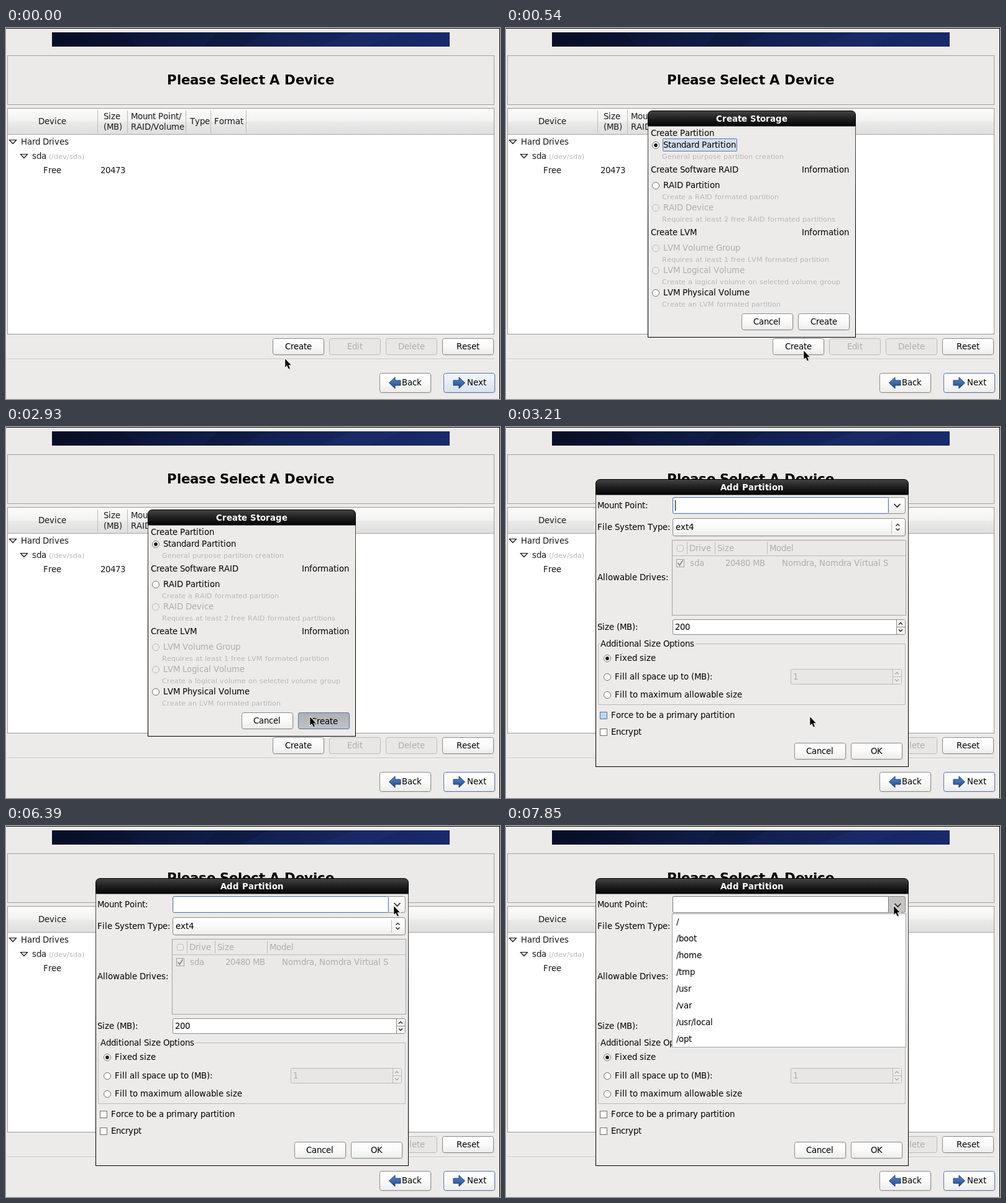
Write an HTML page that moves like this. It is 795 px wide and 598 px high and loops after 8000 ms.

```html
<!DOCTYPE html>
<html lang="en">
<head>
<meta charset="utf-8">
<title>Partition setup</title>
<style>
  html, body { margin: 0; width: 100%; height: 100%; overflow: hidden; background: #edebe9; }
  svg { display: block; }
  text { fill: #1a1a1a; white-space: pre; font-variant-ligatures: none; font-kerning: none; }
  .k { fill: #000; }
  .off { fill: #b0aeac; }
  .small { fill: #bab8b6; }
  .bar { fill: #fff; }
  .head { fill: #000; }
</style>
</head>
<body>
<svg id="stage" width="795" height="598" viewBox="0 0 795 598">
  <defs>
    <linearGradient id="banner"><stop stop-color="#080f28"/><stop offset=".5" stop-color="#11204f"/><stop offset="1" stop-color="#182a6c"/></linearGradient>
    <linearGradient id="face" x2="0" y2="1"><stop stop-color="#fff"/><stop offset=".5" stop-color="#fafafa"/><stop offset="1" stop-color="#ececeb"/></linearGradient>
    <linearGradient id="blueFace" x2="0" y2="1"><stop stop-color="#f4f7fb"/><stop offset="1" stop-color="#d9e1ed"/></linearGradient>
    <linearGradient id="down" x2="0" y2="1"><stop stop-color="#aeb0b4"/><stop offset="1" stop-color="#c0c2c5"/></linearGradient>
    <linearGradient id="header" x2="0" y2="1"><stop stop-color="#fcfcfc"/><stop offset=".5" stop-color="#f2f2f1"/><stop offset=".52" stop-color="#eaeae9"/><stop offset="1" stop-color="#e0dfde"/></linearGradient>
    <linearGradient id="dark" x2="0" y2="1"><stop stop-color="#444"/><stop offset=".5" stop-color="#202020"/><stop offset="1" stop-color="#040404"/></linearGradient>
    <linearGradient id="frame" x2="0" y2="1"><stop stop-color="#555"/><stop offset=".5" stop-color="#000"/></linearGradient>
    <linearGradient id="arrow" x2="0" y2="1"><stop stop-color="#5b8ac6"/><stop offset="1" stop-color="#1f4a8c"/></linearGradient>
  </defs>
</svg>
<script>
const LOOP = 8000;
const BG = '#edebe9', EDGE = '#8d8b89', PALE = '#bdbbb9', BLUE = '#5677ab';
const FAMILY = '"DejaVu Sans", sans-serif';
const FONTS = { small: '11.11px', bar: 'bold 13.33px', head: 'bold 21.33px' };
const stage = document.getElementById('stage');
const pen = document.createElement('canvas').getContext('2d');

// Text sits on the pixel grid: every glyph advances by a whole number of pixels
const fontOf = cls => `${FONTS[cls] || '13.33px'} ${FAMILY}`;
function advances(str, cls) {
  pen.font = fontOf(cls);
  return [...str].map(ch => Math.round(pen.measureText(ch).width));
}
function text(x, y, str, cls = '') {
  let next = x;
  const xs = advances(str, cls).map(w => (next += w) - w);
  return `<text x="${xs.join(' ')}" y="${y}" class="${cls}" style='font: ${fontOf(cls)}'>${str}</text>`;
}
function centered(x, y, str, cls = '') {
  const width = advances(str, cls).reduce((sum, w) => sum + w, 0);
  return text(Math.floor(x - width / 2), y, str, cls);
}

// Shapes: whole-pixel boxes with crisp one-pixel borders
const rect = (x, y, w, h, fill) => `<rect x="${x}" y="${y}" width="${w}" height="${h}" fill="${fill}"/>`;
const box = (x, y, w, h, fill, edge = EDGE, r = 0) =>
  `<rect x="${x + .5}" y="${y + .5}" width="${w - 1}" height="${h - 1}" rx="${r}" fill="${fill}" stroke="${edge}"/>`;
const raised = (x, y, w, h, fill = 'url(#face)', edge = EDGE) =>
  box(x + 1, y + 1, w, h, 'none', '#0001', 3) + box(x, y, w, h, fill, edge, 3);
const path = (d, stroke, width = 1, fill = 'none') =>
  `<path d="${d}" fill="${fill}" stroke="${stroke}" stroke-width="${width}"/>`;
const vline = (x, y, h, color = PALE) => rect(x, y, 1, h, color);

const button = (x, y, label, on = true) =>
  (on ? raised(x, y, 83, 27) : box(x, y, 83, 27, '#e9e7e5', PALE, 3)) +
  centered(x + 41.5, y + 18, label, on ? 'k' : 'off');

const radio = (x, y, { on = true, dot = false, fill = '#fff' } = {}) =>
  `<circle cx="${x}" cy="${y}" r="5.5" fill="${on ? fill : BG}" stroke="${on ? '#73716f' : PALE}"/>` +
  (dot ? `<circle cx="${x}" cy="${y}" r="2.9" fill="#1a1a1a"/>` : '');

const check = (y, fill = '#fff', edge = '#73716f') => box(151, y, 12, 12, fill, edge);

const chevron = (x, y, dir = 1, size = 3, color = '#222', width = 1.3) =>
  path(`M${x - size} ${y - dir * size / 2}l${size} ${dir * size}l${size} ${-dir * size}`, color, width);

const expander = (x, y) => path(`M${x - 5.5} ${y - 3.5}h11l-5.5 6z`, '#111', 1.2, '#fff');

const bigArrow = (x, y, dir) => `<path transform="translate(${x} ${y}) scale(${dir} 1)"
  d="M-9 -4H0V-9L9.5 0L0 9V4H-9Z" fill="url(#arrow)" stroke="#1b3d75" stroke-linejoin="round"/>`;

const dialog = (x, y, w, h, title) =>
  rect(x, y + 20, w, h - 20, 'url(#frame)') + rect(x + 1, y + 20, w - 2, h - 21, BG) +
  `<path d="M${x + .5} ${y + 25}v-17q0 -7.5 7.5 -7.5h${w - 16}q7.5 0 7.5 7.5v17z" fill="url(#dark)" stroke="#000"/>` +
  centered(x + w / 2, y + 18, title, 'bar');

const spinner = (x, y, w, split, value, on) => {
  const edge = on ? EDGE : PALE, ink = on ? '#222' : '#aaa8a6';
  return box(x, y, w, 25, on ? '#fff' : '#e9e7e5', edge, 2) +
    rect(split, y + 1, x + w - split - 1, 23, on ? '#f4f4f3' : BG) +
    vline(split, y + 1, 23, edge) + rect(split, y + 12, x + w - split, 1, edge) +
    chevron(split + 7, y + 7, -1, 3, ink) + chevron(split + 7, y + 18, 1, 3, ink) +
    text(x + 4, y + 17, value, on ? 'k' : 'off');
};

const nextButton = face =>
  raised(704, 556, 83, 32, `url(#${face})`, BLUE) + bigArrow(729, 572, 1) + text(742, 576, 'Next', 'k');

function mainWindow() {
  return rect(0, 0, 795, 598, BG) + rect(0, 0, 795, 1, '#000') + rect(794, 0, 1, 598, '#000') +
    rect(74, 7, 640, 23, 'url(#banner)') +
    '<path d="M74 30V7H190L212 30ZM340 7H420L380 30H318Z" fill="#050b20" opacity=".18"/>' +
    '<path d="M500 30L560 7H640L580 30Z" fill="#2a4190" opacity=".15"/>' +
    box(2, 44, 784, 80, '#ebeae8', '#a3a19f') + centered(394, 91, 'Please Select A Device', 'head') +
    box(2, 129, 784, 365, '#fff', '#9a9896') + rect(3, 130, 782, 41, 'url(#header)') +
    rect(3, 171, 782, 1, '#a9a7a5') +
    [147, 195, 289, 329, 386].map(x => vline(x, 133, 36)).join('') +
    centered(75, 155, 'Device') + text(157, 147, 'Size') + text(157, 164, '(MB)') +
    text(201, 147, 'Mount Point/') + text(201, 164, 'RAID/Volume') +
    text(296, 155, 'Type') + text(335, 155, 'Format') +
    expander(11, 184) + text(24, 188, 'Hard Drives') +
    expander(29, 207) + text(42, 211, 'sda') + text(69, 211, '(/dev/sda)', 'small') +
    text(60, 234, 'Free') + text(152, 234, '20473') +
    button(429, 500, 'Create') + button(520, 500, 'Edit', false) +
    button(611, 500, 'Delete', false) + button(702, 500, 'Reset') +
    rect(2, 533, 784, 1, '#c3c1bf') + rect(2, 534, 784, 1, '#fbfbfa') +
    raised(601, 556, 83, 32) + bigArrow(626, 572, -1) + text(637, 576, 'Back', 'k');
}

function storageDialog() {
  const option = (y, label, hint, on = true) =>
    radio(241, y - 4, { on }) + text(253, y, label, on ? 'k' : 'off') + text(251, y + 18, hint, 'small');
  const group = (y, label) => text(233, y, label, 'k') + text(476, y, 'Information', 'k');
  return dialog(228, 133, 335, 366, 'Create Storage') +
    text(233, 174, 'Create Partition', 'k') + text(251, 211, 'General purpose partition creation', 'small') +
    group(233, 'Create Software RAID') +
    option(258, 'RAID Partition', 'Create a RAID formated partition') +
    option(294, 'RAID Device', 'Requires at least 2 free RAID formated partitions', false) +
    group(334, 'Create LVM') +
    option(359, 'LVM Volume Group', 'Requires at least 1 free LVM formated partition', false) +
    option(395, 'LVM Logical Volume', 'Create a logical volume on selected volume group', false) +
    option(431, 'LVM Physical Volume', 'Create an LVM formated partition') +
    button(379, 460, 'Cancel') + button(470, 460, 'Create');
}

const mountEntry = (edge, face) =>
  box(612, 113, 31, 27, face, EDGE, 3) + box(268, 113, 348, 27, '#fff', edge, 2) +
  (edge === BLUE ? box(269, 114, 346, 25, 'none', '#e2eaf4', 1) : '');

function partitionDialog() {
  const size = (y, label, dot) => radio(163, y - 4, { dot }) + text(175, y, label, 'k');
  return dialog(144, 84, 504, 464, 'Add Partition') +
    text(147, 131, 'Mount Point:', 'k') + mountEntry(BLUE, 'url(#face)') + chevron(629.5, 126.5, 1, 5, '#222', 1.6) +
    text(147, 166, 'File System Type:', 'k') + raised(268, 147, 375, 29) +
    vline(620, 151, 21) + chevron(630.5, 158, -1) + chevron(630.5, 165) + text(273, 166, 'ext4', 'k') +
    text(147, 247, 'Allowable Drives:', 'k') + box(267, 182, 377, 122, '#ebe9e7', '#a5a3a1') +
    rect(268, 207, 375, 1, PALE) + [291, 336, 420].map(x => vline(x, 185, 20)).join('') +
    box(275, 190, 11, 11, BG, PALE, 3) +
    text(295, 200, 'Drive', 'off') + text(340, 200, 'Size', 'off') + text(424, 200, 'Model', 'off') +
    box(274, 213, 13, 13, BG, '#a5a3a1') + path('M276.5 219l3 4l5 -8', '#8b8987', 1.8) +
    text(296, 224, 'sda', 'off') + text(353, 224, '20480 MB', 'off') +
    text(444, 224, 'Nomdra, Nomdra Virtual S', 'off') +
    text(147, 327, 'Size (MB):', 'k') + spinner(268, 310, 375, 628, '200', true) +
    path('M152 349.5H148.5V447.5H642.5V349.5H305', PALE) + text(152, 354, 'Additional Size Options', 'k') +
    size(377, 'Fixed size', true) + size(407, 'Fill all space up to (MB):') +
    size(436, 'Fill to maximum allowable size') + spinner(458, 390, 179, 622, '1', false) +
    check(459) + text(169, 469, 'Force to be a primary partition', 'k') +
    check(486) + text(169, 496, 'Encrypt', 'k') +
    button(464, 509, 'Cancel') + button(555, 509, 'OK');
}

function mountMenu() {
  const items = ['/', '/boot', '/home', '/tmp', '/usr', '/var', '/usr/local', '/opt'];
  return mountEntry('#7d7b79', '#c6c4c2') + chevron(630.5, 127.5, 1, 5, '#222', 1.6) +
    box(267, 141, 377, 216, '#fff', '#a5a3a1') +
    items.map((name, i) => text(274, 159 + i * 27, name, 'k')).join('');
}

// Each layer is visible during its [from, to) spans
const layers = [
  [[[0, LOOP]], mainWindow()],
  [[[0, 540]], nextButton('blueFace')],
  [[[540, LOOP]], nextButton('face')],
  [[[420, 3210]], storageDialog()],
  [[[420, 2930]], box(252, 178, 120, 21, '#d5dfee', BLUE, 1)],
  [[[420, 3210]], radio(241, 189, { dot: true }) + text(253, 193, 'Standard Partition', 'k')],
  [[[930, 1050]], radio(241, 427, { fill: '#c3d8f2' })],
  [[[2930, 3210]], box(470, 460, 83, 27, 'url(#down)', BLUE, 3) + centered(512.5, 479, 'Create', 'k')],
  [[[3210, LOOP]], partitionDialog()],
  [[[3210, 3520]], check(459, '#bfd6f1', BLUE)],
  [[[3210, 4060], [4300, 5150], [5550, 6390], [6790, 7570]], vline(272, 118, 17, '#000')],
  [[[7850, LOOP]], mountMenu()],
].map(([spans, markup]) => ({ spans, node: addGroup(markup) }));

const ARROW = 'M.3 .3V13.8L3.3 11L5.8 16.5L8 15.5L5.5 10.2H9.8Z';
const pointer = addGroup(
  `<path d="${ARROW}" transform="translate(1.5 1.5)" opacity=".15"/>` +
  path(ARROW, '#fff', 1.6) + `<path d="${ARROW}"/>`);
const beam = addGroup(path('M-3 -8h2.5l.5 .5l.5 -.5h2.5M0 -8V8M-3 8h2.5l.5 -.5l.5 .5h2.5', '#000'));

// time, x, y
const moves = [
  [0, 449, 533], [120, 470, 525], [270, 479, 520],
  [810, 440, 492], [930, 385, 424], [1050, 345, 330], [1170, 318, 265], [1320, 318, 240],
  [1470, 345, 300], [1590, 402, 405], [1710, 447, 485], [1860, 463, 481], [1980, 479, 476],
  [2130, 482, 472], [2380, 485, 470], [2530, 489, 467],
  [3520, 461, 386], [3670, 460, 300], [3790, 460, 205], [3910, 463, 121],
  [4060, 500, 131], [4180, 540, 138], [4300, 570, 138], [4450, 590, 138],
  [4600, 605, 147], [4720, 617, 152], [4870, 624, 129],
];
const overEntry = [3910, 4180];

function addGroup(markup) {
  const node = document.createElementNS('http://www.w3.org/2000/svg', 'g');
  node.innerHTML = markup;
  stage.append(node);
  return node;
}

const within = (t, [from, to]) => t >= from && t < to;
const show = (node, on) => node.setAttribute('visibility', on ? 'visible' : 'hidden');

function render(t) {
  for (const { spans, node } of layers) show(node, spans.some(span => within(t, span)));
  const [, x, y] = moves.findLast(move => move[0] <= t);
  const inText = within(t, overEntry);
  show(pointer, !inText);
  show(beam, inText);
  pointer.setAttribute('transform', `translate(${x} ${y})`);
  beam.setAttribute('transform', `translate(${x + .5} ${y})`);
}

const start = performance.now();
function tick() {
  render((performance.now() - start) % LOOP);
  requestAnimationFrame(tick);
}
tick();
</script>
</body>
</html>
```
